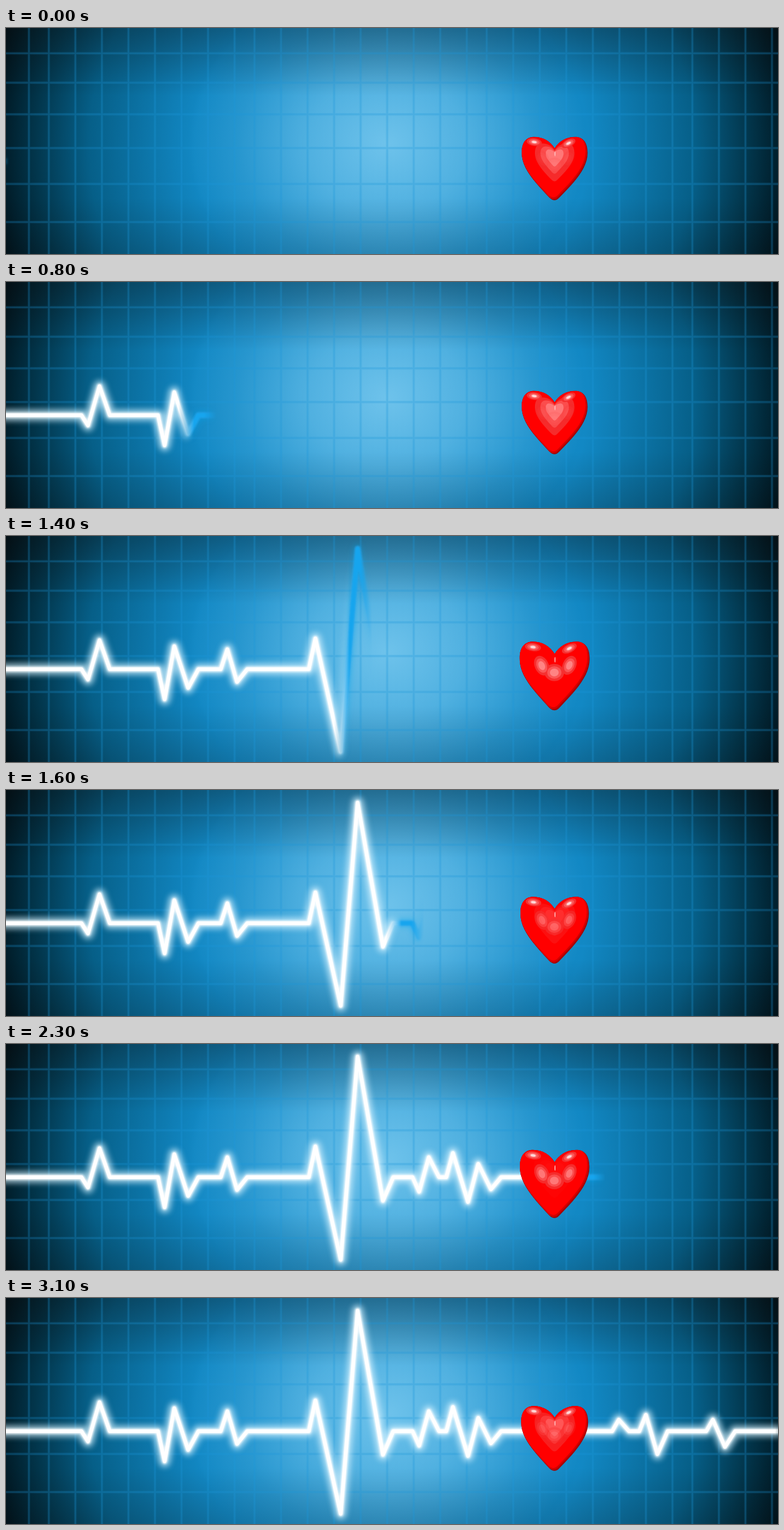
An HTML page that plays this animation: 1280x375 px, repeating every 3200 ms.

```html
<!DOCTYPE html>
<html lang="en">
<head>
<meta charset="utf-8">
<title>Heartbeat</title>
<style>
  html, body { margin: 0; width: 100%; height: 100%; overflow: hidden; background: #000a0f; }
  svg { display: block; width: 100%; height: 100%; }
</style>
</head>
<body>
<svg viewBox="0 0 1280 375" preserveAspectRatio="none">
  <defs>
    <radialGradient id="sea" gradientUnits="userSpaceOnUse" cx="0" cy="0" r="680"
      gradientTransform="translate(640 197) scale(1 .9)">
      <stop offset="0" stop-color="#1690d0"/>
      <stop offset=".48" stop-color="#1288c4"/>
      <stop offset=".74" stop-color="#065f88"/>
      <stop offset=".87" stop-color="#02364c"/>
      <stop offset="1" stop-color="#000c12"/>
    </radialGradient>
    <radialGradient id="lamp" gradientUnits="userSpaceOnUse" cx="0" cy="0" r="330"
      gradientTransform="translate(632 192) scale(1 .85)">
      <stop offset="0" stop-color="#78c8ee" stop-opacity=".9"/>
      <stop offset=".4" stop-color="#78c8ee" stop-opacity=".6"/>
      <stop offset=".75" stop-color="#78c8ee" stop-opacity=".2"/>
      <stop offset="1" stop-color="#78c8ee" stop-opacity="0"/>
    </radialGradient>
    <linearGradient id="shade" x1="0" y1="0" x2="0" y2="1">
      <stop offset="0" stop-color="#0c1214" stop-opacity=".34"/>
      <stop offset=".3" stop-color="#0c1214" stop-opacity="0"/>
      <stop offset=".75" stop-color="#0c1214" stop-opacity="0"/>
      <stop offset="1" stop-color="#0c1214" stop-opacity=".17"/>
    </linearGradient>
    <linearGradient id="whiteFade" class="head" gradientUnits="userSpaceOnUse" x1="-16" x2="10" y1="0" y2="0">
      <stop offset="0" stop-color="#fff"/>
      <stop offset="1" stop-color="#000"/>
    </linearGradient>
    <linearGradient id="blueFade" class="head" gradientUnits="userSpaceOnUse" x1="-12" x2="47" y1="0" y2="0">
      <stop offset="0" stop-color="#000"/>
      <stop offset=".35" stop-color="#fff"/>
      <stop offset=".65" stop-color="#fff"/>
      <stop offset="1" stop-color="#000"/>
    </linearGradient>
    <mask id="whiteMask" maskUnits="userSpaceOnUse" x="0" y="0" width="1280" height="375">
      <rect width="1280" height="375" fill="url(#whiteFade)"/>
    </mask>
    <mask id="blueMask" maskUnits="userSpaceOnUse" x="0" y="0" width="1280" height="375">
      <rect width="1280" height="375" fill="url(#blueFade)"/>
    </mask>
    <filter id="soft" filterUnits="userSpaceOnUse" x="-80" y="-20" width="1440" height="415">
      <feGaussianBlur stdDeviation="1.6"/>
    </filter>
    <filter id="halo" filterUnits="userSpaceOnUse" x="-80" y="-20" width="1440" height="415">
      <feGaussianBlur stdDeviation="5"/>
    </filter>
    <path id="trace" fill="none" stroke-linejoin="round"/>
    <path id="heart" d="M0-.64C-.12-.85-.35-1-.62-1C-.87-1-1-.82-1-.5C-1,0-.6,.43-.16,.92Q0,1.08,.14,.92C.6,.43,1,0,1-.5C1-.82,.87-1,.62-1C.35-1,.12-.85,0-.64Z"/>
    <clipPath id="heartClip"><use href="#heart"/></clipPath>
  </defs>

  <rect width="1280" height="375" fill="url(#sea)"/>
  <rect width="1280" height="375" fill="url(#lamp)"/>
  <rect width="1280" height="375" fill="url(#shade)"/>
  <g fill="none" stroke="#1c98d6">
    <path class="grid" stroke-width="4.5" stroke-opacity=".16"/>
    <path class="grid" stroke-width="2" stroke-opacity=".18"/>
  </g>

  <g mask="url(#blueMask)" stroke="#16a5ee">
    <use href="#trace" stroke-width="13" stroke-opacity=".4" filter="url(#halo)"/>
    <use href="#trace" stroke-width="9" filter="url(#soft)"/>
  </g>
  <g mask="url(#whiteMask)" stroke="#fff">
    <use href="#trace" stroke="#d4f2ff" stroke-width="19" stroke-opacity=".7" filter="url(#halo)"/>
    <use href="#trace" stroke-width="9" stroke-opacity=".8" filter="url(#soft)"/>
    <use href="#trace" stroke-width="6"/>
  </g>

  <g id="beat">
    <use href="#heart" fill="#a60000"/>
    <g clip-path="url(#heartClip)">
      <use href="#heart" fill="#d40000" transform="translate(-.025 -.035)"/>
      <use href="#heart" fill="#f00" transform="translate(-.035 -.06) scale(.97)"/>
      <g id="rest"></g>
      <g id="swell"></g>
      <g id="shine"></g>
    </g>
  </g>
</svg>
<script>
const $ = id => document.getElementById(id);
const STEP = 100, STEPS = 32;
const BASE = 221, LEAD = 11, TRAIL = 17;

// Columns are evenly spaced but slip back every few lines; rows widen downwards
let grid = '';
for (let i = 0; i < 30; i++) {
  const slip = 11 * Math.floor((i + 7.9) / 8.4);
  grid += `M${38 + 44 * i - slip} 0V375`;
}
for (let i = 0; i < 6; i++) grid += `M0 ${42 + 47 * i + 1.8 * i * i}H1280`;
document.querySelectorAll('.grid').forEach(p => p.setAttribute('d', grid));

// Each beat is its peaks, x and y; the line returns to rest between beats
const beats = [
  [[136, 238], [155, 173]],
  [[263, 271], [279, 183], [302, 252]],
  [[367, 188], [383, 242]],
  [[513, 170], [555, 358], [583, 21], [625, 260]],
  [[685, 245], [701, 188]],
  [[741, 181], [766, 262], [783, 199], [804, 241]],
  [[1016, 202]],
  [[1061, 194], [1080, 259]],
  [[1172, 202], [1192, 247]]
];
const points = beats.flatMap(peaks =>
  [[peaks[0][0] - LEAD, BASE], ...peaks, [peaks.at(-1)[0] + TRAIL, BASE]]);
$('trace').setAttribute('d', `M-70 ${BASE}L${points.join(' ')}H1350`);

const ellipse = (x, y, rx, ry, turn, fill) =>
  `<ellipse rx="${rx}" ry="${ry}" fill="${fill}" transform="translate(${x} ${y}) rotate(${turn})"/>`;
const glow = (size, fill) =>
  `<use href="#heart" fill="${fill}" transform="translate(0 ${.42 * size - .45}) scale(${size})"/>`;

// Nested bands, from wide and deep to small and pale
const bands = [[1, '#f53030'], [.72, '#fb5656'], [.45, '#ff8484']];
const nest = shape => bands.map(([k, fill]) => shape(k, fill)).join('');

$('rest').innerHTML = nest((k, fill) => glow(.6 * k, fill));
$('swell').innerHTML = nest((k, fill) =>
  ellipse(-.37, -.3, .2 * k, .3 * k, -24, fill) +
  ellipse(.42, -.31, .19 * k, .29 * k, 24, fill) +
  ellipse(-.01, -.1, .28 * k, .25 * k, 0, fill));

const gleam = (x, y, turn) => nest((k, fill) => ellipse(x, y, .23 * k, .12 * k, turn, fill)) +
  ellipse(x, y, .07, .035, turn, '#ffd8d8');
$('shine').innerHTML = gleam(-.62, -.84, 8) + gleam(.42, -.8, -28) +
  ellipse(.01, -.47, .013, .08, 0, '#ffc8c8');

const heads = document.querySelectorAll('.head');

function draw(ms) {
  const n = Math.floor(ms / STEP) % STEPS;
  const head = 43 * n - 42;
  heads.forEach(g => g.setAttribute('gradientTransform', `translate(${head} 0)`));

  const pulse = Math.cos((n - 4) * Math.PI / 5);
  const w = 112.2 + 3.8 * pulse, h = 109 + 5 * pulse;
  $('beat').setAttribute('transform',
    `translate(909.7 ${232.8 - .6 * pulse}) scale(${w / 2} ${h / 2})`);
  const full = (pulse + 1) / 2;
  $('rest').setAttribute('opacity', 1 - full);
  $('swell').setAttribute('opacity', full);
}

const start = performance.now();
function tick() {
  draw(performance.now() - start);
  requestAnimationFrame(tick);
}
tick();
</script>
</body>
</html>
```
